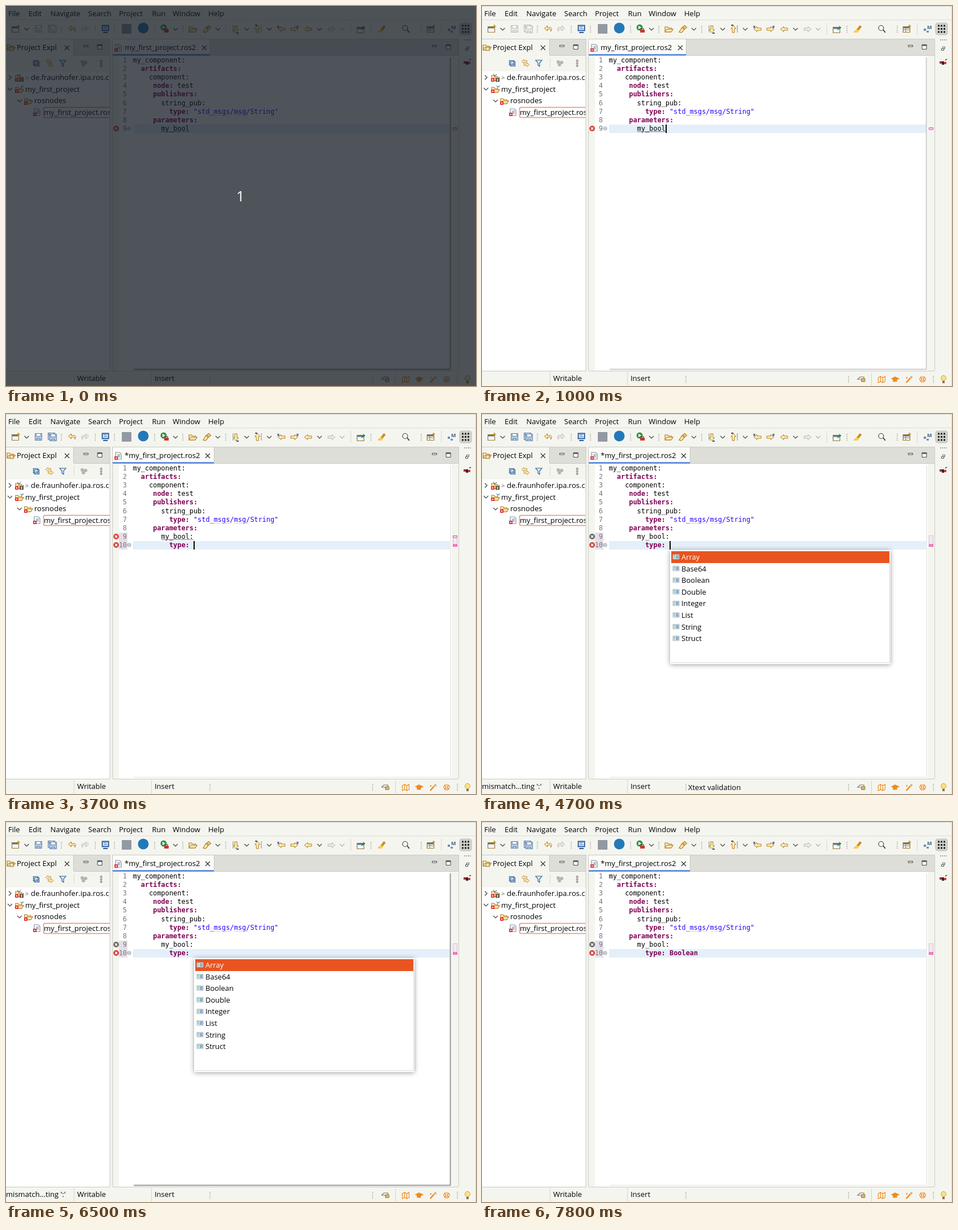
An HTML page for the animation above (8000 ms loop, 832 by 673 pixels).

```html
<!DOCTYPE html>
<html lang="en">
<head>
<meta charset="utf-8">
<title>Code editor</title>
<style>
html, body { margin: 0; width: 100%; height: 100%; overflow: hidden; background: #f5f5f0; }
svg { display: block; }
text { white-space: pre; }
.ui { font: 500 13px "Open Sans", "Noto Sans", sans-serif; fill: #000; }
.code { font: 11.9px "DejaVu Sans Mono", "Liberation Mono", monospace; fill: #000; }
.kw { font-weight: bold; fill: #7f0055; }
.str { fill: #2a00ff; }
.num { fill: #777; text-anchor: end; }
.line { fill: none; stroke-width: 1.2; }
.gold { stroke: #b07a1c; fill: #fff0b8; }
.off { stroke: #b8b8b4; fill: #ecece8; }
.blue { stroke: #2d6398; fill: #dcebf7; }
.save { stroke: #5f82a8; fill: #b9cde2; }
.orange { stroke: #ee8a1d; fill: none; }

/* one loop is 8 s: 1.25% is 100 ms */
.t { animation: 8s step-end infinite; }
.dim { animation-name: dim; }
.clean { animation-name: clean; }
.dirty { animation-name: dirty; }
.one { animation-name: one; }
.two { animation-name: two; }
.bad { animation-name: bad; }
.fixed { animation-name: fixed; }
.typed { animation-name: typed; }
.chosen { animation-name: chosen; }
.popup { animation-name: popup; }
.error { animation-name: error; }
.job { animation-name: job; }
.c1 { animation-name: c1; }
.c2 { animation-name: c2; }
.c3 { animation-name: c3; }
.c4 { animation-name: c4; }
.c5 { animation-name: c5; }
.bars { animation-name: bars; }
@keyframes dim { 0% { opacity: 1 } 1.25%, to { opacity: 0 } }
@keyframes clean { 0% { opacity: 1 } 26.25%, to { opacity: 0 } }
@keyframes dirty { 0% { opacity: 0 } 26.25%, to { opacity: 1 } }
@keyframes one { 0% { opacity: 1 } 33.75%, to { opacity: 0 } }
@keyframes two { 0% { opacity: 0 } 33.75%, to { opacity: 1 } }
@keyframes bad { 0% { opacity: 1 } 52.5%, to { opacity: 0 } }
@keyframes fixed { 0% { opacity: 0 } 52.5%, to { opacity: 1 } }
@keyframes typed { 0% { opacity: 0 } 45%, to { opacity: 1 } }
@keyframes chosen { 0% { opacity: 0 } 92.5%, to { opacity: 1 } }
@keyframes popup { 0%, 92.5%, to { opacity: 0 } 58.75% { opacity: 1 } }
@keyframes error { 0%, 45%, 92.5%, to { opacity: 0 } 35%, 58.75% { opacity: 1 } }
@keyframes job { 0%, 46.25%, 60%, to { opacity: 0 } 45%, 58.75% { opacity: 1 } }
@keyframes c1 { 0%, 18.75%, to { opacity: 0 } 11.25% { opacity: 1 } }
@keyframes c2 { 0%, 33.75%, to { opacity: 0 } 26.25% { opacity: 1 } }
@keyframes c3 { 0%, 40%, to { opacity: 0 } 33.75% { opacity: 1 } }
@keyframes c4 { 0%, 52.5%, 66.25%, 81.25%, 92.5%, to { opacity: 0 } 45%, 56.25%, 73.75%, 88.75% { opacity: 1 } }
@keyframes c5 { 0%, 96.25%, to { opacity: 0 } 92.5% { opacity: 1 } }
@keyframes bars {
  0% { opacity: 1 } 5% { opacity: .75 } 6.25% { opacity: .5 } 7.5% { opacity: .25 } 8.75% { opacity: 0 }
  11.25% { opacity: .2 } 12.5% { opacity: .4 } 13.75% { opacity: .75 } 15% { opacity: 1 }
  17.5% { opacity: .75 } 18.75% { opacity: .5 } 20% { opacity: .25 } 21.25% { opacity: 0 }
  33.75% { opacity: 1 } 36.25% { opacity: .75 } 37.5% { opacity: .5 } 38.75% { opacity: .25 } 40% { opacity: 0 }
  68.75% { opacity: .25 } 70% { opacity: .5 } 71.25% { opacity: .75 } 72.5% { opacity: 1 }
  93.75% { opacity: .75 } 95% { opacity: .5 } 96.25% { opacity: .25 } 97.5%, to { opacity: 0 }
}
</style>
</head>
<body>
<svg width="832" height="673" viewBox="0 0 832 673">
<defs>
  <clipPath id="side"><path d="M0 88h183.500v558H0z"/></clipPath>
  <filter id="shadow" x="-10%" y="-10%" width="120%" height="120%"><feDropShadow dx="0" dy="1" stdDeviation="4.5" flood-opacity=".4"/></filter>
  <path id="chev" d="M-4-2 0 2 4-2" fill="none" stroke="#444" stroke-width="1.2"/>
  <path id="dots" d="M0-5v12" stroke="#999" stroke-width="1.5" stroke-dasharray="1.5 2"/>
  <path id="close" d="M-4-4 4 4M4-4-4 4" stroke="#333" stroke-width="1.3"/>
  <g id="badge"><path d="M-3-3h6v6h-6z" fill="#dd2630"/><path d="M-1.500-1.500l3 3m0-3-3 3" stroke="#fff"/></g>
  <path id="arrow" d="M-6.500 0-1-4.500V-2h7v4h-7v2.500z"/>
  <path id="curl" d="M-6.500-.500-1.500-5v3H3.500c3 0 4 4 1 7 1-3 0-4-2-4h-4v3z"/>
  <path id="star" d="M0-2.500v5M-2-1.500l4 3m0-3-4 3" stroke="#28568c"/>
  <g id="window"><path d="M-6.500-4.500h12v10h-12z" class="line" fill="#fffef4" stroke="#9a7a35"/><path d="M-6-4h11v2.500H-6z" fill="#4579ad"/></g>
  <g id="disk"><path d="M-5.500-6.500h12v12h-12z"/><path d="M-3.500-6.500h8v5h-8z" fill="#fff"/><path d="M-2.500 2.500h6v3h-6z"/></g>
  <g id="saves"><use href="#disk" x="57" y="41"/><use href="#disk" x="80" y="40"/><use href="#disk" x="83" y="42"/></g>
  <g id="mark"><circle r="5"/><path d="M-2-2 2 2M2-2-2 2" stroke="#fff" stroke-width="1.500"/></g>
  <g id="page"><path d="M-5-6h7l3 3v9h-10z" class="line" fill="#fff" stroke="#8690a0"/><path d="M-2-2h5M-2 0h5M-2 2h5" stroke="#6687b0"/><use href="#badge" x="-4" y="4"/></g>
  <g id="folder"><path d="M-6 4v-9h4l2 2h5v2h3L5 4z" class="line gold"/><path d="M-6 4-3-1H8L5 4z" fill="#fbe6b0" stroke="#b07a1c"/></g>
  <g id="fold"><circle r="3" fill="#fff" stroke="#8792a4"/><path d="M-1.700 0h3.400" stroke="#56657e"/></g>
  <g id="minmax" fill="#fff" stroke="#444"><path d="M-4.500-3.500h8v2.500h-8z"/><path d="M20-4.500h8v8h-8z"/><path d="M20-3h8" stroke-width="1.500"/></g>
  <g id="item"><path d="M-5-4H6v8H-5z" fill="#e7f0f8" stroke="#a2b2bd"/><path d="M-4-2h3m-3 3h3" stroke="#496"/><path d="M0-2h5M0 0h5M0 2h5" stroke="#3d6ea5"/></g>
  <path id="caret" d="M0 0v15" stroke="#000" stroke-width="2"/>
</defs>

<!-- window frame -->
<path d="M0 0h832v673H0z" fill="#f5f5f0"/>
<path d="M0 .500h832" stroke="#d5d5d1"/>
<path d="M0 24.500h832" stroke="#dededa"/>
<path d="M831.500 0v673" stroke="#d8d8d3"/>

<g class="ui">
  <text x="4" y="18">File</text><text x="40" y="18">Edit</text><text x="78.500" y="18">Navigate</text>
  <text x="145.500" y="18">Search</text><text x="200" y="18">Project</text><text x="258.500" y="18">Run</text>
  <text x="295" y="18">Window</text><text x="358" y="18">Help</text>
</g>

<!-- main toolbar -->
<g>
  <use href="#dots" x="98" y="40"/><use href="#dots" x="158" y="40"/><use href="#dots" x="192" y="40"/>
  <use href="#dots" x="263" y="40"/><use href="#dots" x="313" y="40"/><use href="#dots" x="389" y="40"/>
  <use href="#dots" x="646" y="40"/><use href="#dots" x="735" y="40"/>
  <path d="M610.500 30v21M770.500 30v21" stroke="#d8d8d3"/>
  <use href="#chev" x="36.500" y="41"/><use href="#chev" x="300" y="41"/><use href="#chev" x="375" y="41"/>
  <use href="#chev" x="426" y="41"/><use href="#chev" x="466" y="41"/><use href="#chev" x="555" y="41"/>
  <use href="#chev" x="595" y="41" opacity=".4"/>

  <use href="#window" x="17" y="41"/><path d="M22 33v6m-3-3h6" stroke="#c99418" stroke-width="1.500"/>
  <use href="#saves" class="t clean off"/>
  <use href="#saves" class="t dirty save"/>
  <use href="#curl" x="117" y="40" class="gold"/>
  <use href="#curl" transform="matrix(-1 0 0 1 140 40)" class="off"/>
  <path d="M170.500 34.500h11v9h-11zM172 47h8" fill="#e8f3ff" stroke="#285d9c" stroke-width="2"/><path d="M173 37h5m-5 3h6" stroke="#285d9c"/>
  <path d="M205 32h17v17h-17z" fill="#9299a3"/>
  <circle cx="243" cy="39" r="9.500" fill="#2379b8"/>

  <circle cx="279" cy="38" r="5.500" fill="#349449"/><path d="M277 35l5 3-5 3z" fill="#fff"/>
  <path d="M280 42h8v5h-8z" fill="#c93532"/><path d="M282 42v-2h4v2" class="line" stroke="#892020"/>
  <use href="#folder" x="330" y="42"/>
  <path d="M349 46l5-8 4 4-5 5z" class="line gold"/><path d="M355 37l4-3 4 4-4 3z" fill="#f1bd65" stroke="#a77624"/>

  <use href="#arrow" transform="translate(407 41) rotate(-90)" class="gold"/><path d="M402 34v13" stroke="#7187a5"/><path d="M408 48h4" stroke="#28568c" stroke-width="2"/>
  <use href="#arrow" transform="translate(445 41) rotate(90)" class="gold"/><path d="M452 34v13" stroke="#7187a5"/><path d="M441 34h4" stroke="#28568c" stroke-width="2"/>
  <use href="#arrow" x="488" y="41" class="gold"/><use href="#star" x="482" y="37"/>
  <use href="#arrow" transform="matrix(-1 0 0 1 510 41)" class="gold"/><use href="#star" x="516" y="37"/>
  <use href="#arrow" x="535" y="41" class="gold"/>
  <use href="#arrow" transform="matrix(-1 0 0 1 576 41)" class="off"/>
  <use href="#window" x="628" y="42"/><path d="M629 42l4-5 2 2zM632 35l4 4" fill="#319b62" stroke="#237749"/>
  <path d="M657 47h8l7-10-3-3z" fill="#f7cd4d"/><path d="M664 41l5-7 3 3-6 6z" fill="#c58a20"/>
  <circle cx="706.500" cy="39" r="4.500" class="line" stroke="#444"/><path d="M710 42l4 5" stroke="#444" stroke-width="2"/>
  <use href="#window" x="752" y="41"/><path d="M750 37v9M746 42h11" stroke="#9a7a35"/><path d="M757 33v5m-2.500-2.500h5" stroke="#c99418" stroke-width="1.500"/>
  <path d="M782 40h4v4h-4zM787 44h4v3h-4z" fill="#638db9"/><text x="788" y="41" font-family="Open Sans, sans-serif" font-size="9" font-weight="700" fill="#3e6290">M</text>
  <rect x="803" y="30" width="21" height="21" rx="4" fill="#d3d3ce" stroke="#bbbbb5"/>
  <path d="M807 35h13M807 40.500h13M807 46h13" stroke="#222" stroke-width="3" stroke-dasharray="3 2"/>
</g>

<!-- project view -->
<path d="M0 58h184v588H0z" fill="#f5f5f0"/>
<path d="M120 58h64v29h-64z" fill="#deded9"/>
<path d="M0 116h183v530H0z" fill="#fff"/>
<path d="M0 58.500h184M120 87.500h64M119.500 58v29M184 58v588M0 646.500h184" fill="none" stroke="#c9c9c3"/>
<use href="#folder" x="8" y="74"/><path d="M7 73h6v6H7z" fill="#f6e5b7" stroke="#a0782e"/>
<text class="ui" x="19" y="78">Project Expl</text>
<use href="#close" x="108" y="74"/><use href="#minmax" x="142" y="73"/>
<path d="M48.500 96.500h8v8h-8zM50.500 98.500h8v8h-8z" class="line blue"/><path d="M52 102.500h5" stroke="#285d9c"/>
<g class="gold"><use href="#arrow" transform="translate(75 98) scale(.75)"/><use href="#arrow" transform="matrix(-.75 0 0 .75 79 104)"/></g>
<path d="M95 96h11l-4 5v6l-3-2v-4z" class="line blue"/>
<path d="M120.500 92v19" stroke="#d8d8d3"/>
<g fill="#b5b5b0"><circle cx="135" cy="99" r="3"/><circle cx="141" cy="100" r="3"/><circle cx="137" cy="104" r="3"/></g>
<g fill="#fff" stroke="#555"><circle cx="168.500" cy="97" r="1.500"/><circle cx="168.500" cy="101.500" r="1.500"/><circle cx="168.500" cy="106" r="1.500"/></g>
<g clip-path="url(#side)">
  <use href="#chev" transform="translate(7 126.500) rotate(-90)"/>
  <use href="#chev" x="7" y="147"/><use href="#chev" x="24" y="168"/>
  <use href="#folder" x="23" y="128"/><path d="M24 128h7v6h-7z" fill="#473b2b"/><path d="M25 131h5m-2.500-2.500v5" stroke="#fff"/><use href="#badge" x="19" y="131"/>
  <use href="#folder" x="23" y="149"/><use href="#badge" x="19" y="151"/>
  <path d="M20 121l3 3 3-3m0 20 2 3 3-3" class="line" stroke="#4a78a5"/>
  <use href="#folder" x="39" y="169"/><use href="#badge" x="35" y="172"/>
  <use href="#page" x="55" y="188"/>
  <rect x="66.500" y="179.500" width="124" height="18" rx="3" fill="#fff" stroke="#ef8c70" stroke-width="1.500"/>
  <g class="ui">
    <text x="34" y="131" style="font-size:11px;fill:#555">&gt;</text><text x="44" y="131">de.fraunhofer.ipa.ros.c</text>
    <text x="34" y="151.500">my_first_project</text><text x="50" y="172">rosnodes</text><text x="67" y="193">my_first_project.ros2</text>
  </g>
</g>

<!-- editor -->
<path d="M189 58h612v588H189z" fill="#fff"/>
<path d="M189 58h612v29H189z" fill="#deded9"/>
<path d="M189 88h11v558h-11zM789 88h12v558h-12z" fill="#f5f5f0"/>
<path d="M188.500 58v588M801.500 58v588M189 58.500h612M189 87.500h612M189 646.500h612" stroke="#c9c9c3"/>
<g class="t clean">
  <path d="M189 59h172v28H189z" fill="#fbfbf8"/><path d="M361.500 58v29" stroke="#c4c4be"/><path d="M189 86.500h172" stroke="#4f82dc" stroke-width="2.500"/>
  <text class="ui" x="210" y="78">my_first_project.ros2</text><use href="#close" x="351" y="74"/>
</g>
<g class="t dirty">
  <path d="M189 59h179v28H189z" fill="#fbfbf8"/><path d="M368.500 58v29" stroke="#c4c4be"/><path d="M189 86.500h179" stroke="#4f82dc" stroke-width="2.500"/>
  <text class="ui" x="210" y="78">*my_first_project.ros2</text><use href="#close" x="357" y="74"/>
</g>
<use href="#page" x="199" y="74"/>
<use href="#minmax" x="759" y="73"/>

<path class="t one" d="M225 210h561v15H225z" fill="#e4eff9"/>
<path class="t two" d="M225 225h563v15H225z" fill="#e4eff9"/>
<path class="t dirty" d="M200 210h15v15h-15z" fill="#e6dfe9"/>
<path class="t two" d="M200 225h15v15h-15z" fill="#e6dfe9"/>
<g class="code num">
  <text x="214" y="99.500">1</text><text x="214" y="114.700">2</text><text x="214" y="129.900">3</text>
  <text x="214" y="145.100">4</text><text x="214" y="160.300">5</text><text x="214" y="175.500">6</text>
  <text x="214" y="190.700">7</text><text x="214" y="205.900">8</text><text x="214" y="221.100">9</text>
  <text class="t two" x="214" y="236.300">10</text>
</g>
<g class="code">
  <text x="224.500" y="99.500">my_component:</text>
  <text x="224.500" y="114.700" class="kw">  artifacts:</text>
  <text x="224.500" y="129.900">    component:</text>
  <text x="224.500" y="145.100">     <tspan class="kw">node:</tspan> test</text>
  <text x="224.500" y="160.300" class="kw">     publishers:</text>
  <text x="224.500" y="175.500">       string_pub:</text>
  <text x="224.500" y="190.700">         <tspan class="kw">type:</tspan> <tspan class="str">"std_msgs/msg/String"</tspan></text>
  <text x="224.500" y="205.900" class="kw">     parameters:</text>
  <text x="224.500" y="221.100">       my_bool</text>
  <text x="324.800" y="221.100" class="t dirty">:</text>
  <text x="224.500" y="236.300" class="kw t typed">         type:</text>
  <text x="332" y="236.300" class="kw t chosen">Boolean</text>
</g>
<path d="M368 193.500h29m7 0h22" stroke="#e59aa5" stroke-dasharray="1.500 1.500"/>
<g class="t bad" stroke="#e8488a"><path d="M275 222.500h50"/><path class="t dirty" d="M325 222.500h7"/></g>

<use class="t bad" href="#mark" x="195" y="217" fill="#d9403a"/>
<use class="t fixed" href="#mark" x="195" y="217" fill="#686868"/>
<use class="t two" href="#mark" x="195" y="232" fill="#d9403a"/>
<use class="t one" href="#fold" x="218" y="217"/>
<use class="t two" href="#fold" x="218" y="232"/>

<g fill="#ffd2e9" stroke="#ec4aa5">
  <path class="t two" d="M791.500 215.500h7v19h-7z" fill="#f1eaf3" stroke="#d4bfd9"/>
  <path class="t bad" d="M791.500 215.500h7v3.500h-7z"/>
  <path class="t two" d="M791.500 231h7v3.500h-7z" fill="#ff8ac6"/>
</g>

<path d="M787 91v553M226 643.500h561" stroke="#ededeb" stroke-width="2"/>
<g class="t bars" stroke="#aaa" stroke-width="2.500" stroke-linecap="round"><path d="M786.700 92v551M227 643.500h559"/></g>

<use class="t c1" href="#caret" x="326" y="210"/>
<use class="t c2" href="#caret" x="333" y="210"/>
<use class="t c3" href="#caret" x="276" y="225"/>
<use class="t c4" href="#caret" x="333" y="225"/>
<use class="t c5" href="#caret" x="383" y="225"/>

<!-- right strip -->
<path d="M811 60h12" stroke="#888" stroke-width="1.500" stroke-dasharray="2 1.500"/>
<path d="M815.500 72.500h4v3h-4zM813.500 75.500h4v3h-4z" fill="#fff" stroke="#555"/>
<path d="M810 98h4v4h-4z" fill="#a22b3b"/><path d="M814 98h4v6h-4z" fill="#3d2422"/><path d="M818 99h4v4h-4z" fill="#d33b36"/><path d="M820 96l3-2" stroke="#333" stroke-width="1.500"/>

<!-- status bar -->
<path d="M120.500 648v24M257.500 648v24M689.500 650v22" stroke="#d5d5cf"/>
<use href="#dots" x="361" y="660"/><use href="#dots" x="649" y="660"/><use href="#dots" x="799" y="660"/>
<g class="ui">
  <text x="126" y="664">Writable</text><text x="263" y="664">Insert</text>
  <text class="t error" x="0" y="664">mismatch...ting ':'</text><text class="t job" x="365" y="666">Xtext validation</text>
</g>
<path d="M665 661l4-4h7v8h-4v-4z" class="line" fill="#ddd" stroke="#777"/><path d="M672 660h6v5h-6z" fill="#e1bf68" stroke="#8f7634"/>
<g class="line orange">
  <path d="M701.500 658l4-2 4 2 4-2v9l-4 2-4-2-4 2zM705.500 656v9m4-7v9"/>
  <path d="M725 660l6-3 7 3-7 3zM728 662v3h6v-3" fill="#ee8a1d"/>
  <path d="M751 667l7-8" stroke-width="2.500"/><path d="M760 655v5m-2.500-2.500h5M752 657v3m-1.500-1.500h3"/>
  <circle cx="780" cy="661" r="5"/><circle cx="780" cy="661" r="2"/><path d="M776.500 657.500l2 2m3 3 2 2m0-7-2 2m-3 3-2 2"/>
</g>
<circle cx="817" cy="659" r="4.500" fill="#ffe283" stroke="#d59c22"/><path d="M815 664h4v4h-4z" fill="#777"/>

<!-- completion list -->
<g class="t popup">
  <path d="M333 241h390v202H333z" fill="#fff" filter="url(#shadow)"/>
  <path d="M334 440.500h387.500V243" fill="none" stroke="#d8d8d5"/>
  <path d="M335 243h386v21H335z" fill="#e95420"/>
  <use href="#item" x="343" y="253"/><use href="#item" x="343" y="273.600"/><use href="#item" x="343" y="294.200"/><use href="#item" x="343" y="314.800"/>
  <use href="#item" x="343" y="335.400"/><use href="#item" x="343" y="356"/><use href="#item" x="343" y="376.600"/><use href="#item" x="343" y="397.200"/>
  <g class="ui">
    <text x="353" y="258" style="fill:#fff">Array</text><text x="353" y="278.600">Base64</text><text x="353" y="299.200">Boolean</text><text x="353" y="319.800">Double</text>
    <text x="353" y="340.400">Integer</text><text x="353" y="361">List</text><text x="353" y="381.600">String</text><text x="353" y="402.200">Struct</text>
  </g>
</g>

<!-- countdown -->
<g class="t dim">
  <path d="M0 0h832v673H0z" fill="#151b25" fill-opacity=".75"/>
  <text x="415" y="346" text-anchor="middle" font-family="Open Sans, Noto Sans, sans-serif" font-size="26" font-weight="500" fill="#fff">1</text>
</g>
</svg>
</body>
</html>
```
